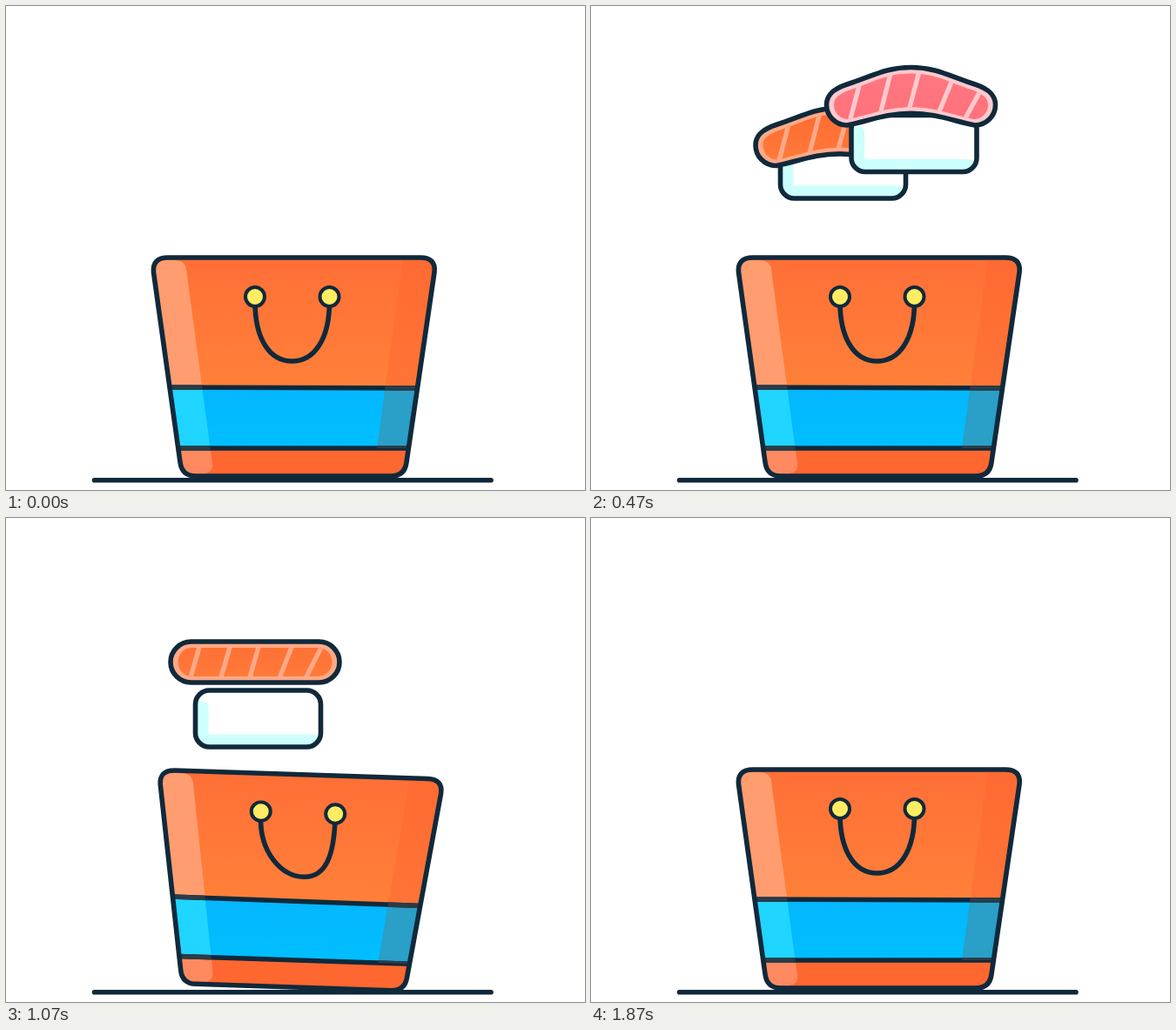
Recreate the animation shown at these times as an HTML page with a canvas. Size 665 by 556 pixels, loop 1940 ms.

```html
<!DOCTYPE html>
<html lang="en">
<head>
<meta charset="utf-8">
<title>Sushi bag</title>
<style>
html, body { margin: 0; width: 100%; height: 100%; overflow: hidden; background: #fff; }
canvas { display: block; }
</style>
</head>
<body>
<canvas id="stage" width="665" height="556"></canvas>
<script>
const ctx = document.getElementById('stage').getContext('2d');
const LOOP = 1940, STEP = 200 / 3, INK = '#10293b';

// One value per step of a jump, beginning at step 2 of the jump
const JUMP = {
  rice: [273, 246, 221, 199.5, 193, 190.5, 190.5, 194, 207, 223.5, 242, 263, 290],
  fish: [225, 192, 160, 129, 117, 113.5, 111.5, 112, 119, 130, 146, 165.5, 192],
  bend: [19.5, 19.5, 19.5, 20, 20, 19.5, 19.5, 17, 11, 5.5, 2, 0, 0]
};
// Bag tilt in degrees and sideways handle swing, beginning at step 15
const TILT = [0.9, 1.9, 0.8, -0.9, -1.8, 1.2, 2];
const SWING = [4, 9, 5, -3, -8, -5, 0, 2.5, 4, 2, -2, -2, -1];

const SALMON = { x: 286, delay: 3, first: 5, rim: '#ffa987', top: '#ff6d33', bottom: '#ff7b3a' };
const TUNA = { x: 367.5, delay: 0, first: 3, rim: '#ffc9ce', top: '#ff7680', bottom: '#ff717b' };
const STRIPES = [[-64, -75], [-29, -40], [4, -7], [42, 27], [76, 57]];

const BAG = new Path2D('M186 289H476Q494 289 492 306L460 524Q458 540 442 540H218Q202 540 200 524L169.5 306Q168 289 186 289Z');
const SHINE = new Path2D('M165 292H194Q205 292 207 302L237 526Q238 536 228 537H190Z');
const SHADE = new Path2D('M456 289H500V508H426Z');

function fill(path, color) {
  ctx.fillStyle = color;
  ctx.fill(path);
}

function stroke(path, width = 5.6, color = INK) {
  ctx.lineWidth = width;
  ctx.strokeStyle = color;
  ctx.stroke(path);
}

function clipped(path, draw) {
  ctx.save();
  ctx.clip(path);
  draw();
  ctx.restore();
}

function fade(y0, y1, from, to) {
  const g = ctx.createLinearGradient(0, y0, 0, y1);
  g.addColorStop(0, from);
  g.addColorStop(1, to);
  return g;
}

// Rounded slab, half width w and half height h, whose middle is lifted by bend
function slab(w, h, bend) {
  const e = w - h, k = h * 0.55, p = new Path2D();
  const top = -h - bend, low = h - bend * 0.7;
  const side = -h - bend * 0.43, under = h - bend * 0.25, end = -h + bend * 0.22;
  p.moveTo(-e, -h);
  p.bezierCurveTo(-e * 0.63, side, -e * 0.4, top, 0, top);
  p.bezierCurveTo(e * 0.4, top, e * 0.63, side, e, -h);
  p.bezierCurveTo(e + k, end, w, -k, w, 0);
  p.bezierCurveTo(w, k, e + k, h, e, h);
  p.bezierCurveTo(e * 0.65, under, e * 0.4, low, 0, low);
  p.bezierCurveTo(-e * 0.4, low, -e * 0.65, under, -e, h);
  p.bezierCurveTo(-e - k, h, -w, k, -w, 0);
  p.bezierCurveTo(-w, -k, -e - k, end, -e, -h);
  p.closePath();
  return p;
}

function drawRice(x, bottom) {
  const box = new Path2D(), shade = new Path2D();
  box.roundRect(x - 68.5, bottom - 65, 144, 65, 16);
  shade.roundRect(x - 68, bottom - 52, 14.5, 56, [0, 6, 0, 0]);
  shade.roundRect(x - 68, bottom - 14.5, 140, 20, [0, 5, 0, 0]);
  fill(box, '#fff');
  clipped(box, () => fill(shade, '#ccfffe'));
  stroke(box);
}

function drawFish(kind, y, bend) {
  const body = slab(97, 23.5, bend), meat = slab(88.5, 16.5, bend);
  const lift = x => bend * (0.5 + 0.5 * Math.cos(Math.PI * x / 97));
  const shift = bend / 4;
  ctx.save();
  ctx.translate(kind.x, y);
  fill(body, kind.rim);
  fill(meat, fade(-30, 20, kind.top, kind.bottom));
  clipped(meat, () => {
    for (const [a, b] of STRIPES) {
      const line = new Path2D();
      line.moveTo(a + shift, -17 - lift(a + shift));
      line.lineTo(b + shift, 21 - 0.8 * lift(b + shift));
      stroke(line, 5.3, kind.rim);
    }
  });
  stroke(body);
  ctx.restore();
}

function drawSushi(kind, step) {
  const i = step - kind.delay - 2;
  if (step < kind.first || i >= JUMP.rice.length) return;
  drawRice(kind.x, JUMP.rice[i]);
  drawFish(kind, JUMP.fish[i], JUMP.bend[i]);
}

function drawBag(tilt, swing) {
  const pivot = tilt < 0 ? 210 : 450;
  ctx.save();
  // A tilted bag is squashed and settles closer to the ground
  ctx.translate(pivot, 541 + Math.min(3, 1.6 * Math.abs(tilt)));
  ctx.rotate(tilt * Math.PI / 180);
  ctx.scale(1, 1 - 0.0137 * Math.abs(tilt));
  ctx.translate(-pivot, -541);

  fill(BAG, fade(289, 438, '#ff6f37', '#ff8039'));
  clipped(BAG, () => {
    fill(SHADE, fade(289, 438, '#ff6a32', '#ff7436'));
    fill(SHINE, '#ff9d70');
    const base = new Path2D('M160 508H500V545H160Z');
    fill(base, '#ff6730');
    clipped(base, () => fill(SHINE, '#ff8a60'));
    const band = new Path2D('M160 438L500 439V508H160Z');
    fill(band, fade(438, 508, '#05b6ff', '#00bfff'));
    clipped(band, () => {
      fill(SHINE, '#20d5ff');
      fill(SHADE, '#2a9fc7');
    });
    const seams = new Path2D('M180 438L480 439M190 508H470');
    stroke(seams);
    for (const area of [SHINE, SHADE]) clipped(area, () => stroke(seams, 5.6, '#2a3c47'));
  });
  stroke(BAG);

  const x = 328.5 + swing, y = 408 + Math.min(1.5, Math.abs(swing));
  stroke(new Path2D(`M286 340C286 382 ${x - 26} ${y} ${x} ${y}S371.5 382 371.5 340`));
  for (const cx of [286, 371.5]) {
    const button = new Path2D();
    button.arc(cx, 334, 11, 0, 7);
    fill(button, '#ffec62');
    stroke(button, 4);
  }
  ctx.restore();
}

function frame() {
  // The motion is stepped at 15 poses per second
  const step = Math.floor((performance.now() % LOOP + 3.4) / STEP);
  ctx.clearRect(0, 0, 665, 556);
  ctx.lineCap = ctx.lineJoin = 'round';
  drawSushi(SALMON, step);
  drawSushi(TUNA, step);
  stroke(new Path2D('M101.5 544.8H557'));
  drawBag(TILT[step - 15] || 0, SWING[step - 15] || 0);
  requestAnimationFrame(frame);
}
frame();
</script>
</body>
</html>
```
